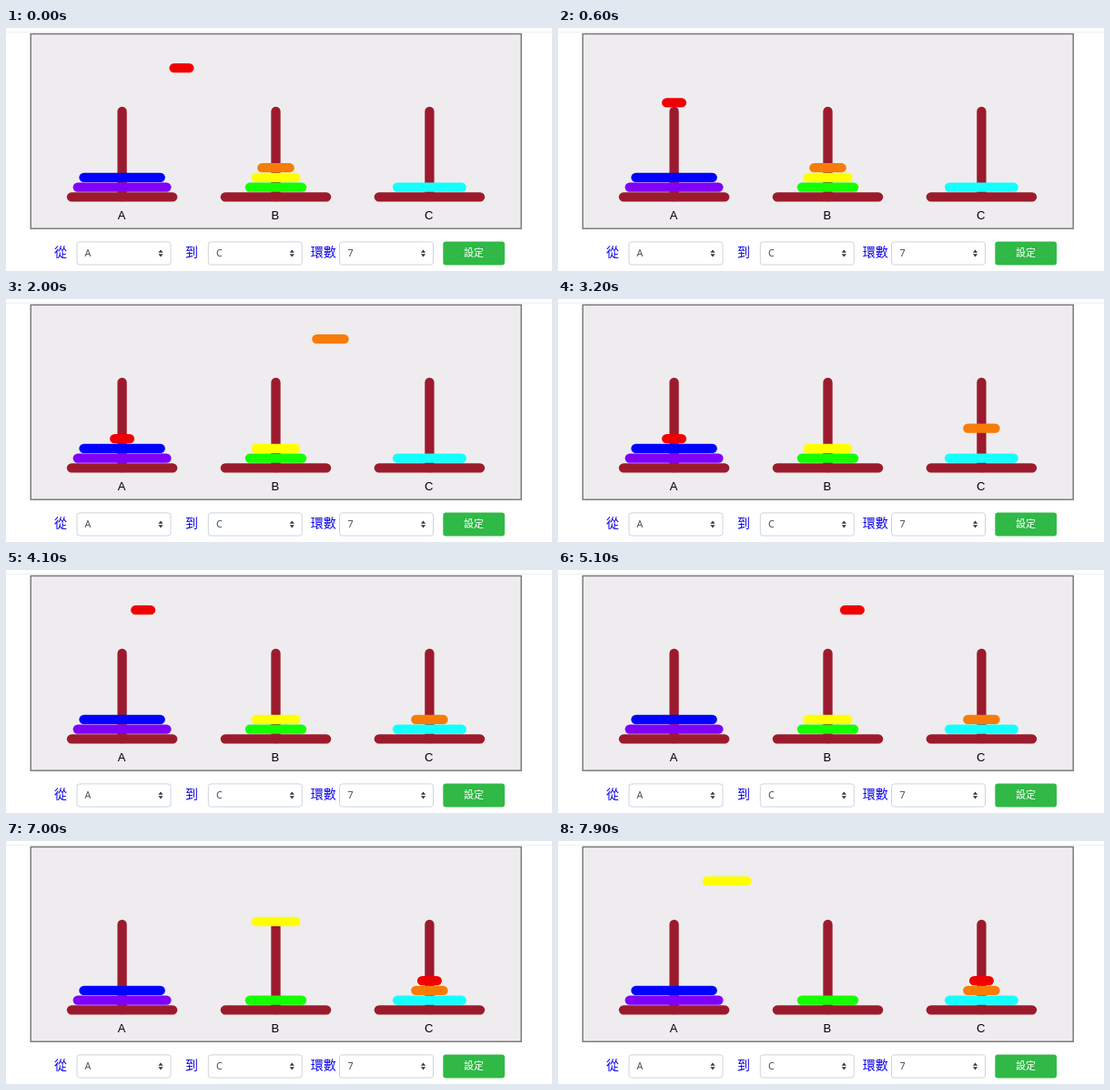
An HTML page that plays this animation: 600 px wide and 268 px high, repeating every 8 s.

```html
<!DOCTYPE html>
<html lang="zh-Hant">
<head>
<meta charset="utf-8">
<title>Tower of Hanoi</title>
<style>
html, body { margin: 0; width: 100%; height: 100%; overflow: hidden; background: #fff; }
svg { display: block; }
text { text-anchor: middle; }
.bar { stroke-width: 10.3; stroke-linecap: round; }
.peg { font: 13px "Liberation Sans", Arial, sans-serif; }
.label { font: 14px "Noto Sans CJK TC", "Noto Sans CJK", sans-serif; fill: #0a00e6; }
.value { font: 10.8px "Noto Sans", sans-serif; fill: #495057; }
.button { font: 11px "Noto Sans CJK TC", "Noto Sans CJK", sans-serif; fill: #fff; }
.select { fill: #fff; stroke: #ced4da; }
</style>
</head>
<body>
<svg id="stage" width="600" height="268" viewBox="0 0 600 268">
  <path d="M0 4.5H600" stroke="#f0f0f2"/>
  <rect x="27.2" y="6.5" width="539" height="214.7" fill="#eeecee" stroke="#737373" stroke-width="1.4"/>
</svg>
<script>
const stage = document.getElementById('stage');
const PEGS = { A: 127.6, B: 296.5, C: 465.4 };
const UNIT = 13.5, TOP = 44.2, SPEED = 0.1727, LOOP = 8000, STEP = 100;
const COLORS = ['#f00000', '#f77c08', '#ffff00', '#14ff00', '#14ffff', '#0000ff', '#8000f8'];
const level = n => 186.3 - 10.7 * n;

function add(tag, attrs, text = '') {
  const el = document.createElementNS('http://www.w3.org/2000/svg', tag);
  for (const key in attrs) el.setAttribute(key, attrs[key]);
  el.textContent = text;
  return stage.appendChild(el);
}

// Round-capped horizontal bar centred on the origin; size counts in units
function bar(size, stroke) {
  const half = size * UNIT / 2 - 5.15;
  return add('path', { class: 'bar', stroke, d: `M${-half} 0H${half}` });
}

function place(el, [x, y]) {
  el.setAttribute('transform', `translate(${x} ${y})`);
}

for (const [name, x] of Object.entries(PEGS)) {
  add('path', { class: 'bar', stroke: '#9b1b2d', d: `M${x} 92V186` });
  place(bar(9, '#9b1b2d'), [x, level(0)]);
  add('text', { class: 'peg', x: x - 0.6, y: 211 }, name);
}

const discs = COLORS.map((color, i) => bar(i + 2, color));

// Starting peg and level of every disc, smallest first
const START = [['B', 4], ['B', 3], ['B', 2], ['B', 1], ['C', 1], ['A', 1], ['A', 2]];
START[5] = ['A', 2];
START[6] = ['A', 1];

// Disc, from peg and level, to peg and level
const MOVES = [
  [0, 'B', 4, 'A', 3],
  [1, 'B', 3, 'C', 2],
  [0, 'A', 3, 'C', 3],
  [2, 'B', 2, 'A', 3]
];

// Distance already covered by the first move when the loop opens
const LEAD = level(4) < TOP ? 0 : level(4) - TOP + PEGS.B - 193;

function draw(time) {
  const spots = START.map(([peg, n]) => [PEGS[peg], level(n)]);
  let left = LEAD + time * SPEED;
  for (const [disc, from, n, to, m] of MOVES) {
    const x = PEGS[from], y = level(n), dx = PEGS[to] - x;
    const up = y - TOP, across = Math.abs(dx), down = level(m) - TOP;
    const rise = Math.min(left, up);
    const slide = Math.min(Math.max(left - up, 0), across);
    const drop = Math.min(Math.max(left - up - across, 0), down);
    spots[disc] = [x + Math.sign(dx) * slide, y - rise + drop];
    left -= up + across + down;
    if (left <= 0) break;
  }
  discs.forEach((el, i) => place(el, spots[i]));
}

function select(x, value) {
  add('rect', { class: 'select', x, y: 235.9, width: 103, height: 25.2, rx: 3 });
  add('text', { class: 'value', x: x + 12, y: 252.3 }, value);
  const cx = x + 92;
  add('path', { fill: '#343a40', d: `M${cx - 2.6} 247.7h5.2l-2.6 -3.2zM${cx - 2.6} 249.2h5.2l-2.6 3.2z` });
}

[[60, '從'], [204, '到'], [348.7, '環數']].forEach(([x, text]) =>
  add('text', { class: 'label', x, y: 252.3 }, text));
select(78, 'A');
select(222.3, 'C');
select(366.5, '7');
add('rect', { x: 480.3, y: 235.5, width: 67.7, height: 26, rx: 3, fill: '#30b946' });
add('text', { class: 'button', x: 514, y: 252.2 }, '設定');

const begin = performance.now();
function tick() {
  const time = (performance.now() - begin) % LOOP;
  draw(Math.floor(time / STEP) * STEP);
  requestAnimationFrame(tick);
}
tick();
</script>
</body>
</html>
```
